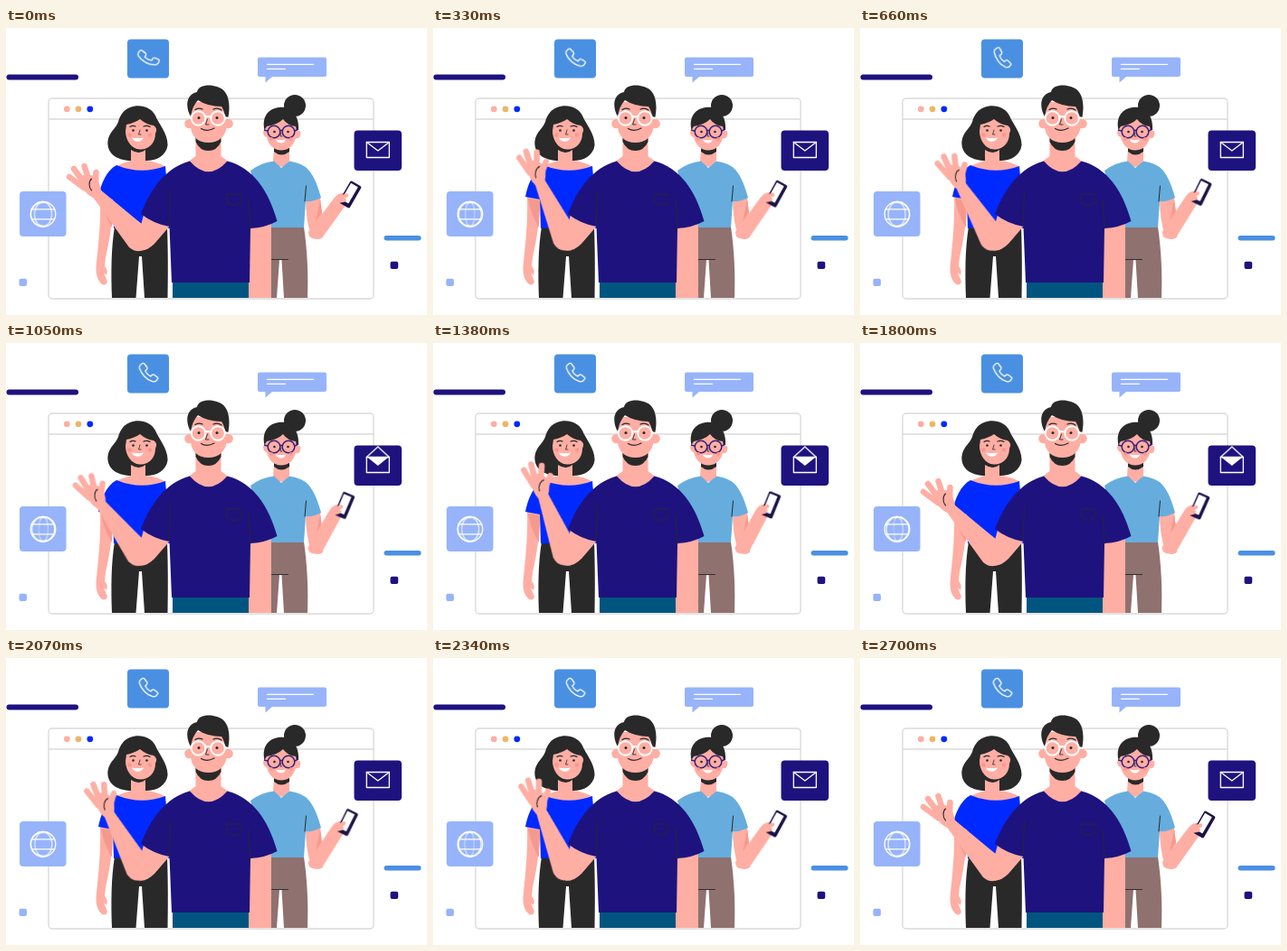
Write an HTML page without scripts that moves like this. It is 465 px wide and 318 px high and loops after 2730 ms.

```html
<!DOCTYPE html>
<html lang="en">
<head>
<meta charset="utf-8">
<title>Team greeting</title>
<style>
html, body { margin: 0; width: 100%; height: 100%; overflow: hidden; background: #fff; }
svg { display: block; width: 465px; height: 318px; }
.navy { fill: #1e127f; }
.blue { fill: #4a90e2; }
.pale { fill: #97b4fa; }
.royal { fill: #0029ff; }
.sky { fill: #66addd; }
.skin { fill: #ffaea4; }
.shade { fill: #f6998d; }
.blush { fill: #ff958b; }
.dark { fill: #292929; }
.line { fill: none; stroke: #292929; stroke-linecap: round; }
.white { fill: none; stroke: #fff; stroke-width: 1.3; stroke-linejoin: round; stroke-linecap: round; }
.digit { fill: none; stroke: #ffaea4; stroke-linecap: round; }

.wave, .lift, .ring, .flap, .liner, .meridian { animation: 2730ms infinite cubic-bezier(.37, 0, .63, 1); }
.wave { animation-name: wave; transform-origin: 148px 232px; }
.lift { animation-name: lift; transform-origin: 340px 232px; }
.ring { animation-name: ring; }
.flap { animation-name: flap; transform-origin: 410px 126.5px; }
.liner { animation-name: liner; animation-timing-function: step-end; }
.meridian { animation-name: spin; }
.flap, .meridian { vector-effect: non-scaling-stroke; }
.m2 { animation-delay: -682.5ms; }
.m3 { animation-delay: -1365ms; }
.m4 { animation-delay: -2047.5ms; }

@keyframes wave {
  0%, 32.97%, 65.93%, 98.9%, 100% { transform: rotate(0deg); }
  16.48%, 49.45%, 82.42% { transform: rotate(22deg); }
}
@keyframes lift {
  0%, 98.9%, 100% { transform: rotate(0deg); }
  49.45% { transform: rotate(-8deg); }
}
@keyframes ring {
  0%, 16.1% { transform: rotate(-18deg); }
  8%, 24.2% { transform: rotate(8deg); }
  32%, 100% { transform: rotate(0deg); }
}
@keyframes flap {
  0%, 25.3%, 73.6%, 100% { transform: scaleY(1); }
  32%, 66.9% { transform: scaleY(-1.2); }
}
@keyframes liner {
  0%, 70.3%, 100% { opacity: 0; }
  28.6% { opacity: 1; }
}
@keyframes spin {
  from { transform: scaleX(-1); }
  to { transform: scaleX(1); }
}
</style>
</head>
<body>
<svg viewBox="0 0 465 318">
  <defs>
    <path id="half" d="M0-13.500A13.500 13.500 0 0 1 0 13.500"/>
  </defs>

  <!-- browser window -->
  <g fill="none" stroke="#dadada" stroke-width="1.4">
    <rect x="47" y="78" width="359" height="222" rx="4"/>
    <path d="M47 101H406"/>
  </g>
  <circle class="skin" cx="67.3" cy="89.8" r="3.4"/>
  <circle cx="80" cy="89.8" r="3.4" fill="#efb566"/>
  <circle class="royal" cx="92.8" cy="89.8" r="3.4"/>

  <!-- loose accents -->
  <rect class="navy" x="0.5" y="51.5" width="79.5" height="6" rx="3"/>
  <rect class="blue" x="417.5" y="230" width="41" height="5.5" rx="2.75"/>
  <rect class="pale" x="14.5" y="277.7" width="8.5" height="8.3" rx="2"/>
  <rect class="navy" x="424.5" y="258.8" width="8.7" height="8.3" rx="2"/>

  <!-- speech bubble -->
  <path class="pale" d="M280 32.5H352Q354 32.5 354 34.5V52Q354 54 352 54H294L286.5 60.5V54H280Q278 54 278 52V34.5Q278 32.5 280 32.5Z"/>
  <path class="white" d="M288.500 40.300H339.500M288.500 45.300H308.500"/>

  <!-- call tile -->
  <rect class="blue" x="134" y="12.500" width="46" height="43" rx="4"/>
  <g transform="translate(157.300 33)">
    <path class="white ring" d="M-8.500-9L-6.500-10.500Q-5-11-4-9.500L-1.500-6Q-1-4.500-2-3.500L-3.500-2Q-1.500 2 2.500 4L4 2.500Q5 1.500 6.500 2.300L10 5Q11 6 10 7.200L8.500 9Q7 10.300 4.500 9.700C-2 8-8 1-9.800-5Q-10.300-7.500-8.500-9Z"/>
  </g>

  <!-- globe tile -->
  <rect class="pale" x="15" y="181" width="51.500" height="50" rx="4"/>
  <g class="white" transform="translate(41 206.300)">
    <circle r="13.800"/>
    <path d="M-12.500-5.500H12.500M-12.500 5.500H12.500"/>
    <use href="#half" class="meridian"/>
    <use href="#half" class="meridian m2"/>
    <use href="#half" class="meridian m3"/>
    <use href="#half" class="meridian m4"/>
  </g>

  <!-- mail tile -->
  <rect class="navy" x="384.500" y="113.500" width="52.500" height="44.500" rx="4"/>
  <rect class="white" x="398.300" y="126.500" width="25" height="17"/>
  <path class="liner" fill="#fff" d="M399 126.500H422.500L410.800 136Z"/>
  <path class="white flap" d="M398.300 126.500L410.800 136L423.300 126.500"/>

  <!-- woman with loose hair -->
  <path class="skin" d="M104 187L118 190C118 215 114 237 110 254L109 264Q113 268 111 274L108 271L112 281Q110 287 105 283Q99 277 99.500 265C102 240 105 215 104 187Z"/>
  <path class="shade" d="M105 189L118 191L117 221Q108 207 105 189Z"/>
  <path class="dark" d="M120 220H178C179 248 179 275 178.500 299H153L150 253H147L143.500 299H117C116 272 116 245 120 220Z"/>
  <path class="dark" d="M137 88C147 84 160 87 165 97C169 107 179 117 178.500 130C177 142 165 148 152 147H136C121 146 111 138 112.500 125C114 115 121 112 124 104C126 96 131 90 137 88Z"/>
  <path class="skin" d="M138 128H154V147Q167 148 177 154Q150 167 121 153Q131 149 138 147Z"/>
  <path class="dark" d="M138 129H154V135Q147 141 138 135Z"/>
  <path class="skin" d="M133 107Q142 105 148 101Q155 107 163 108Q168 111 165 117C165 128 157 135 148 134.500C138 134 132 124 132 114Z"/>
  <path class="royal" d="M122 152Q149 163 176 153L182 222H119L118 190L102 187C105 172 111 158 122 152Z"/>
  <path class="line" stroke-width="1.300" d="M137 109.500Q140 107.500 143 109M152 109Q156 107.500 159 109.500"/>
  <circle class="dark" cx="140.500" cy="113.500" r="1.300"/>
  <circle class="dark" cx="155.500" cy="113.500" r="1.300"/>
  <path class="line" stroke-width=".8" d="M148 113L146.500 118H149"/>
  <circle class="blush" cx="136.500" cy="118.500" r="2.300"/>
  <circle class="blush" cx="159" cy="118.500" r="2.300"/>
  <path fill="#fff" d="M139 121.500Q146 123 152 121.500Q150 126 145 125.700Q140 125 139 121.500Z"/>

  <!-- woman with bun -->
  <path fill="#8f716f" d="M292 220H329C333 248 334 275 333 299H307L304.500 257H302L299 299H290Z"/>
  <path class="line" stroke-width=".9" d="M293 256.500H311.500"/>
  <path class="skin" d="M331 187L347 187Q349 208 351 218L350 232Q342 237 337 229Q331 214 331 187Z"/>
  <path class="shade" d="M342 215L347 190L349 204Z"/>
  <g class="lift">
    <path class="skin" d="M334 226L362 189Q368 181 377 183L376 195L351 230Q342 237 335 231Z"/>
    <g transform="rotate(30 380 184.500)">
      <rect x="373" y="170.500" width="14" height="28" rx="2" fill="#1c1447"/>
      <rect fill="#fff" x="374.500" y="173" width="9" height="21" rx=".5"/>
    </g>
    <path class="digit" stroke-width="4.500" d="M366 189L376 185.500M366 192L373.500 190.500"/>
  </g>
  <path class="skin" d="M296 133H313V147Q305 160 295 148Z"/>
  <path class="sky" d="M270 158Q282 149 296 147.500L304 155L313 147.500Q328 150 334 157C341 165 345 177 348 188Q339 193 331 192L329 221H287Z"/>
  <path class="line" stroke-width="1" d="M331.500 175L330 192"/>
  <circle class="dark" cx="319" cy="86" r="12"/>
  <path class="dark" d="M286 115C282 102 287 90 301 88C315 86 324 97 323 113Z"/>
  <path class="dark" d="M296 133H313V137Q304 144 296 137Z"/>
  <path class="skin" d="M288 109Q300 107 306 101Q311 108 320 109L321 114Q327 113 325 119Q324 123 320 122C317 132 311 135.500 304 135.500C295 135.500 290 129 288 121Q284 120 284 115Z"/>
  <g fill="none" stroke="#34207b" stroke-width="1.500">
    <circle cx="296" cy="115" r="6.800"/><circle cx="312" cy="115" r="6.800"/>
    <path d="M303 114Q304 112.500 305.200 114M289 114L285 113M319 114L323 112"/>
  </g>
  <circle class="dark" cx="296.500" cy="115" r="1.300"/>
  <circle class="dark" cx="311.500" cy="115" r="1.300"/>
  <path class="line" stroke-width=".8" d="M304 116L303 120H305"/>
  <circle class="blush" cx="293" cy="123" r="2"/>
  <circle class="blush" cx="315" cy="123" r="2"/>
  <path fill="#fff" d="M298 123.500Q304 125 309 123.500Q308 127.500 303.500 127.500Q299 127 298 123.500Z"/>

  <!-- man: arms -->
  <path class="skin" d="M266 219L293 213V299H266Z"/>
  <path class="skin" d="M152 207L182 218L164 239Q152 251 141 244L148 222Z"/>
  <g class="wave">
    <path class="skin" d="M95 186L104 179L143 211.500L160 225L157 244Q145 251 136 243Z"/>
    <path class="skin" d="M80 170L85 163Q92 162 98 164Q104 170 105 181L96 188Q86 183 80 170Z"/>
    <path class="digit" stroke-width="6.500" d="M86 177L70 165M86 171L75 156M92 170L86.500 153M99 174L99.500 160"/>
    <path class="line" stroke-width="1.100" d="M94.500 167C91 170 91.500 177 94.500 180"/>
  </g>

  <!-- man: body -->
  <path fill="#005580" d="M184 280H268V299H184Z"/>
  <path class="skin" d="M209.500 118H237.500V142L247 149Q224 174 200 149L209.500 142Z"/>
  <path class="navy" d="M203 147.500Q223.500 171 244.500 147.500C273 155 290 180 299.500 214Q287 221 270 222L269 282H183L180.500 220Q163 217 149 206C160 178 176 155 203 147.500Z"/>
  <path class="line" stroke-width=".9" d="M181.500 181L180 219M268 190L270 222M245 184H259V194L252 197L245 194Z"/>

  <!-- man: head -->
  <path class="dark" d="M209.500 118H237.500V126Q233 136 223.500 136Q214 136 209.500 126Z"/>
  <circle class="skin" cx="245.500" cy="106" r="5.300"/>
  <circle class="skin" cx="202.500" cy="106" r="5.300"/>
  <path class="skin" d="M204 82H244V108C243 120 235 127 223.500 127C212 127 204 120 204 108Z"/>
  <path class="dark" d="M204 98C199 90 197 74 211 71C212 63 225 62 233 65C245 68 249 82 245 101L242 98Q241 91 238 87Q223 87 212 80Q206 86 204 98Z"/>
  <path class="line" stroke-width="1.300" d="M209 90.500Q213 88 217 90M229 90Q234 88 238 91"/>
  <g fill="none" stroke="#fff" stroke-width="1.900">
    <circle cx="212.500" cy="100" r="7.800"/><circle cx="234" cy="100" r="7.800"/>
    <path d="M220 99Q223 97 226.300 99M241.500 99L246 100"/>
  </g>
  <circle class="dark" cx="213" cy="99.500" r="1.500"/>
  <circle class="dark" cx="233" cy="99.500" r="1.500"/>
  <path class="line" stroke-width=".9" d="M222.500 101L220.500 107H224"/>
  <path class="line" stroke-width="1.200" d="M215.500 111.500Q222 115.500 230 111"/>
</svg>
</body>
</html>
```
